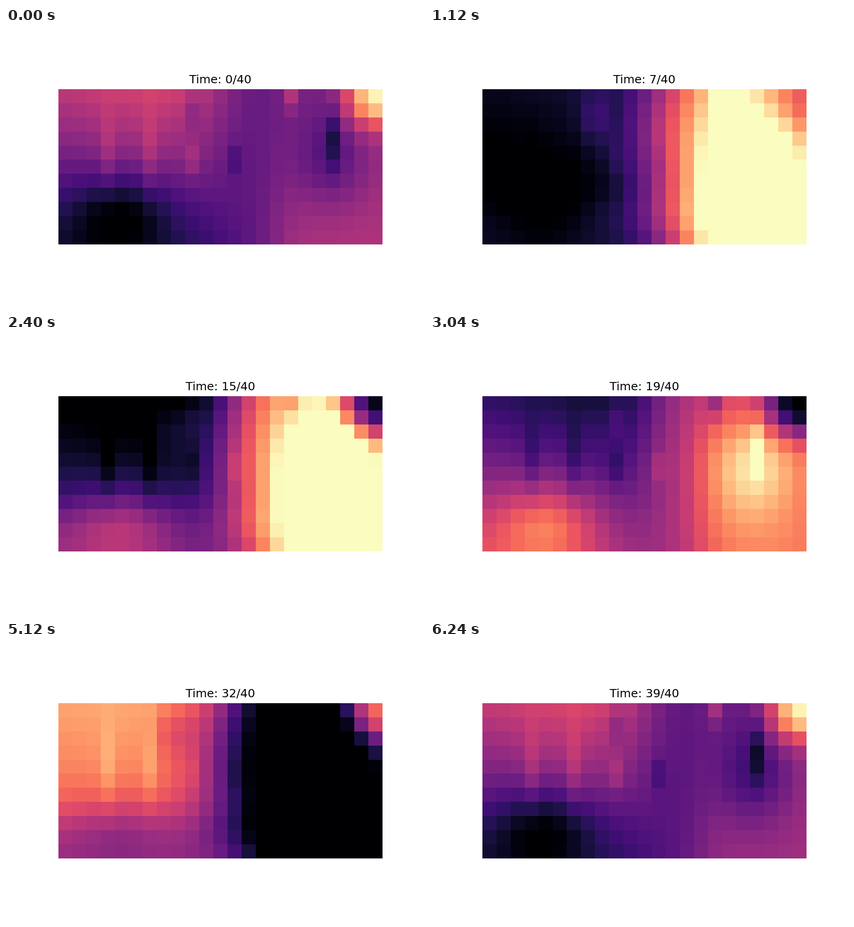
Animation of 917 by 611 pixels, one loop 6.4 s. Source, as a matplotlib script:

```python
import math

import matplotlib.pyplot as plt
import numpy as np
from matplotlib.animation import FuncAnimation

W, H, DPI = 917, 611, 128
ROWS, COLS = 11, 23
FRAMES, INTERVAL = 40, 160
PERIOD = 39.3  # the cycle is slightly shorter than the loop
LEFT, TOP, CELL = 114.6, 134.0, 30.9

row, col = np.mgrid[:ROWS, :COLS]


def step(x, centre, width):
    """Smooth rise from 0 to 1; a negative width makes it fall."""
    return 1 / (1 + np.exp(-(x - centre) / width))


def bump(r, c, r_spread, c_spread):
    return np.exp(-((row - r) / r_spread) ** 2 / 2
                  - ((col - c) / c_spread) ** 2 / 2)


def streak(r, c, length):
    """A vertical ridge about one cell wide."""
    return bump(r, c, length, 0.45)


def make_mean():
    right = step(col, 15, 0.8) * (0.07 + 0.13 * step(row, 2, 1))
    valley = np.exp(-((col - 10) / 2) ** 2 / 2)
    return 0.365 + right - 0.04 * valley


def make_cosine():
    slope = 0.14 + 0.01 * col - 0.037 * row
    west = slope - 0.25 * bump(8.5, 4, 2, 2.5)
    east = -0.08 - 0.2 * bump(4.5, 18.7, 2.5, 2.2) + 0.62 * bump(0, 22, 1.5, 1.5)
    share = step(col, 11, -1)
    field = share * west + (1 - share) * east
    field += 0.08 * (streak(4, 3, 2) + streak(4, 6, 2) + streak(4.5, 9, 0.8))
    field -= 0.08 * (streak(4.5, 12, 0.8) + streak(1, 9, 1))
    return field - 0.17 * streak(3, 19, 1.4) + 0.15 * streak(0, 16, 0.7)


def make_sine():
    front = 11.5 + 0.045 * (row - 3.3) ** 2
    field = -0.42 + 0.23 * step(row, 7.5, 0.8) + 1.05 * step(col, front, 1.6)
    field += 0.5 * bump(5, 18.3, 3, 2)
    field -= 0.62 * bump(0, 22, 1.8, 1.8) + 0.2 * bump(6, 22.5, 4, 0.8)
    field += 0.12 * bump(1.5, 7.5, 1.3, 0.8)
    return field - 0.05 * (streak(4, 3, 2) + streak(4, 6, 2))


mean, cosine, sine = make_mean(), make_cosine(), make_sine()


def field_at(t):
    angle = 2 * math.pi * t / PERIOD
    return mean + cosine * math.cos(angle) + sine * math.sin(angle)


fig = plt.figure(figsize=(W / DPI, H / DPI), dpi=DPI, facecolor="white")
width, height = COLS * CELL, ROWS * CELL
ax = fig.add_axes([LEFT / W, 1 - (TOP + height) / H, width / W, height / H])
ax.axis("off")
image = ax.imshow(field_at(0), cmap="magma", vmin=0, vmax=1,
                  interpolation="nearest", aspect="auto")
title = ax.set_title("", fontname="DejaVu Sans", fontsize=14.33, pad=7.6)


def update(t):
    image.set_data(field_at(t))
    title.set_text(f"Time: {t}/{FRAMES}")
    return image, title


anim = FuncAnimation(fig, update, frames=FRAMES, interval=INTERVAL,
                     repeat=True, repeat_delay=0, blit=False)
plt.show()
```
